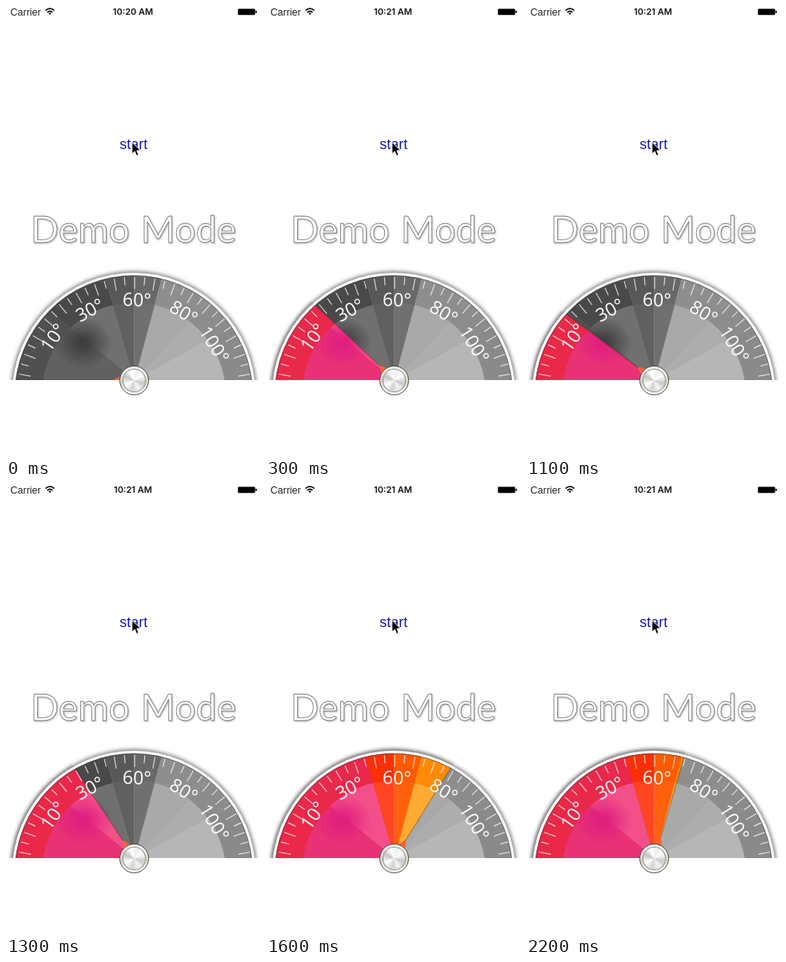
An HTML page for the animation above (2400 ms loop, 318x563 px).

```html
<!DOCTYPE html>
<html lang="en">
<head>
<meta charset="utf-8">
<title>Dial demo</title>
<style>
  html, body { margin: 0; width: 100%; height: 100%; overflow: hidden; background: #fff; }
  #stage { position: relative; width: 318px; height: 563px; overflow: hidden; }
  svg { position: absolute; left: 0; top: 0; }
  .ui { font-family: "Liberation Sans", Arial, sans-serif; }
  .clock { font: 600 11px Inter, sans-serif; fill: #111; }
  .title {
    font: 46.5px Lato, sans-serif; word-spacing: 2px;
    fill: #fff; stroke: #777; stroke-width: .85;
    filter: drop-shadow(1.5px 1.5px 1px rgba(0, 0, 0, .25));
  }
  .label { font: 23px "Open Sans", sans-serif; fill: #fff; text-anchor: middle; }
  #knob {
    position: absolute; left: 142px; top: 450px; width: 37px; height: 37px;
    box-sizing: border-box; border: 1.5px solid #4c493c; border-radius: 50%;
    background: linear-gradient(#fff, #dddbd2 55%, #fff);
  }
  #knob::after {
    content: ""; position: absolute; inset: 4px; border-radius: 50%;
    background: conic-gradient(from 20deg, #eee, #fff 10%, #c8c8c8 25%, #f4f4f4 36%,
      #d2d2d2 48%, #fff 62%, #c4c4c4 76%, #fff 88%, #eee);
    box-shadow: 0 0 1.5px 1px rgba(80, 78, 66, .7);
  }
</style>
</head>
<body>
<div id="stage">
  <svg width="318" height="563" viewBox="0 0 318 563">
    <defs>
      <clipPath id="upper"><rect width="318" height="468"/></clipPath>
      <clipPath id="disc"><circle cx="160" cy="486" r="149"/></clipPath>
      <clipPath id="core"><circle cx="160" cy="486" r="115"/></clipPath>
      <clipPath id="sweep"><path id="sweepPath"/></clipPath>
      <filter id="soft" x="-10%" y="-10%" width="120%" height="120%">
        <feGaussianBlur stdDeviation="2.6"/>
      </filter>
    </defs>

    <g class="ui">
      <text x="5.5" y="11.5" font-size="12.5" fill="#222">Carrier</text>
      <text x="142.2" y="178.5" font-size="18" fill="#1717a6">start</text>
    </g>
    <text id="clock" class="clock" x="159" y="11.3" text-anchor="middle">10:20 AM</text>
    <g fill="none" stroke="#111" stroke-width="1.7">
      <path d="M49.5 5.6Q55 .8 60.5 5.6M51.7 8Q55 5 58.3 8"/>
      <path d="M53.3 9.3Q55 7.8 56.7 9.3L55 11.3Z" fill="#111" stroke="none"/>
    </g>
    <rect x="290.4" y="3.4" width="21.4" height="7.8" rx="1.3"/>
    <path d="M312.4 5.4Q314.2 5.6 314.2 7.2T312.4 9Z"/>

    <text class="title" x="159.5" y="296.3" text-anchor="middle">Demo Mode</text>

    <g clip-path="url(#upper)">
      <circle cx="160" cy="486" r="154" fill="#555" opacity=".8" filter="url(#soft)"/>
      <g clip-path="url(#sweep)">
        <circle cx="160" cy="486" r="154" fill="#333" opacity=".4" filter="url(#soft)"/>
      </g>
      <circle cx="160" cy="486" r="152.6" fill="#fff" stroke="#aaa" stroke-width=".7"/>
      <g id="grayFace" clip-path="url(#disc)"></g>
      <g clip-path="url(#sweep)"><g id="colorFace" clip-path="url(#disc)"></g></g>
      <g clip-path="url(#disc)">
        <path id="edge" d="M161 468V310" stroke="#43392e" stroke-width="1.4" opacity=".35"/>
      </g>
      <circle cx="160" cy="486" r="148.6" fill="none" stroke="#333" stroke-opacity=".45"/>
      <g id="ticks" stroke="#fff" stroke-opacity=".75" stroke-width="1.2"></g>
      <g id="labels"></g>
      <path id="needle" d="M161 441L169 457H153Z" fill="#f4633a"/>
    </g>

    <path d="M157.8 170.3V185L161.2 181.8L163.5 187.4L166.1 186.3L163.8 180.9H168.5Z"
      fill="#000" stroke="#fff" stroke-width="1"/>
  </svg>
  <div id="knob"></div>
</div>
<script>
const NS = "http://www.w3.org/2000/svg";
const LOOP = 2400, STEP = 100;
const HUB = { x: 161, y: 468 };   // sectors and needle turn here
const RIM = { x: 161, y: 486 };   // centre of the scale

// The needle swings to each new value, overshoots it and settles back.
const REST = -90, SWING_TIME = 830, OVERSHOOT = 3;
const MOVES = [{ at: 0, to: -53.3 }, { at: 1258, to: 16.3 }];

const BOUNDS = [-92, -51, -16, 0, 15, 43, 61, 92];
const GRAY = {
  outer: ["#505050", "#494949", "#585858", "#686868", "#8e8e8e", "#8c8c8c", "#8a8a8a"],
  inner: ["#616161", "#707070", "#606060", "#707070", "#a9a9a9", "#adadad", "#b6b6b6"],
  blob: "#3f3f3f"
};
const COLOR = {
  outer: ["#ea2848", "#e9284b", "#fb2f05", "#ff5a00", "#ff8a08", "#ffa41a", "#ffb52a"],
  inner: ["#e93275", "#f3508a", "#ff4522", "#ff600c", "#ffab32", "#ffbd45", "#ffc95a"],
  blob: "#e0207f"
};

const $ = id => document.getElementById(id);

function add(parent, tag, attrs) {
  const el = document.createElementNS(NS, tag);
  for (const k in attrs) el.setAttribute(k, attrs[k]);
  parent.appendChild(el);
  return el;
}

function polar(c, deg, r) {
  const a = deg * Math.PI / 180;
  return [c.x + r * Math.sin(a), c.y - r * Math.cos(a)];
}

function wedge(from, to, r) {
  return `M${HUB.x} ${HUB.y}L${polar(HUB, from, r)}A${r} ${r} 0 0 1 ${polar(HUB, to, r)}Z`;
}

function drawFace(id, set) {
  const face = $(id);
  const grad = add(face, "radialGradient", { id: id + "Blob" });
  add(grad, "stop", { offset: .15, "stop-color": set.blob });
  add(grad, "stop", { offset: 1, "stop-color": set.blob, "stop-opacity": 0 });
  const core = add(face, "g", { "clip-path": "url(#core)" });
  set.outer.forEach((fill, i) => {
    const d = wedge(BOUNDS[i], BOUNDS[i + 1], 230);
    face.insertBefore(add(face, "path", { d, fill, stroke: fill, "stroke-width": .4 }), core);
    add(core, "path", { d, fill: set.inner[i] });
  });
  add(core, "ellipse", { cx: 96, cy: 421, rx: 37, ry: 32, fill: `url(#${id}Blob)` });
  add(face, "path", { d: "M160.5 337V468", stroke: "#fff", "stroke-opacity": .16 });
}

drawFace("grayFace", GRAY);
drawFace("colorFace", COLOR);

for (let i = -16; i <= 16; i++) {
  const [x1, y1] = polar(RIM, i * 5, 147);
  const [x2, y2] = polar(RIM, i * 5, i % 2 ? 137 : 132);
  add($("ticks"), "line", { x1, y1, x2, y2 });
}

[["10°", -55, 125], ["30°", -28, 120], ["60°", 1.5, 119], ["80°", 31, 120], ["100°", 58, 118]]
  .forEach(([text, deg, r]) => {
    const [x, y] = polar(RIM, deg, r);
    add($("labels"), "text", {
      class: "label", transform: `translate(${x} ${y}) rotate(${deg})`, y: 8.5
    }).textContent = text;
  });

function easeOutBack(p) {
  const u = Math.min(Math.max(p, 0), 1) - 1;
  return 1 + (OVERSHOOT + 1) * u ** 3 + OVERSHOOT * u ** 2;
}

function angleAt(ms) {
  return MOVES.reduce(
    (from, { at, to }) => from + (to - from) * easeOutBack((ms - at) / SWING_TIME), REST);
}

let shown = -1;
function render() {
  const step = Math.floor(performance.now() % LOOP / STEP);
  if (step !== shown) {
    shown = step;
    const deg = angleAt(step * STEP);
    const turn = `rotate(${deg} ${HUB.x} ${HUB.y})`;
    $("sweepPath").setAttribute("d", wedge(REST, deg, 260));
    $("edge").setAttribute("transform", turn);
    $("needle").setAttribute("transform", turn);
    $("clock").textContent = step < 2 ? "10:20 AM" : "10:21 AM";
  }
  requestAnimationFrame(render);
}
render();
</script>
</body>
</html>
```
